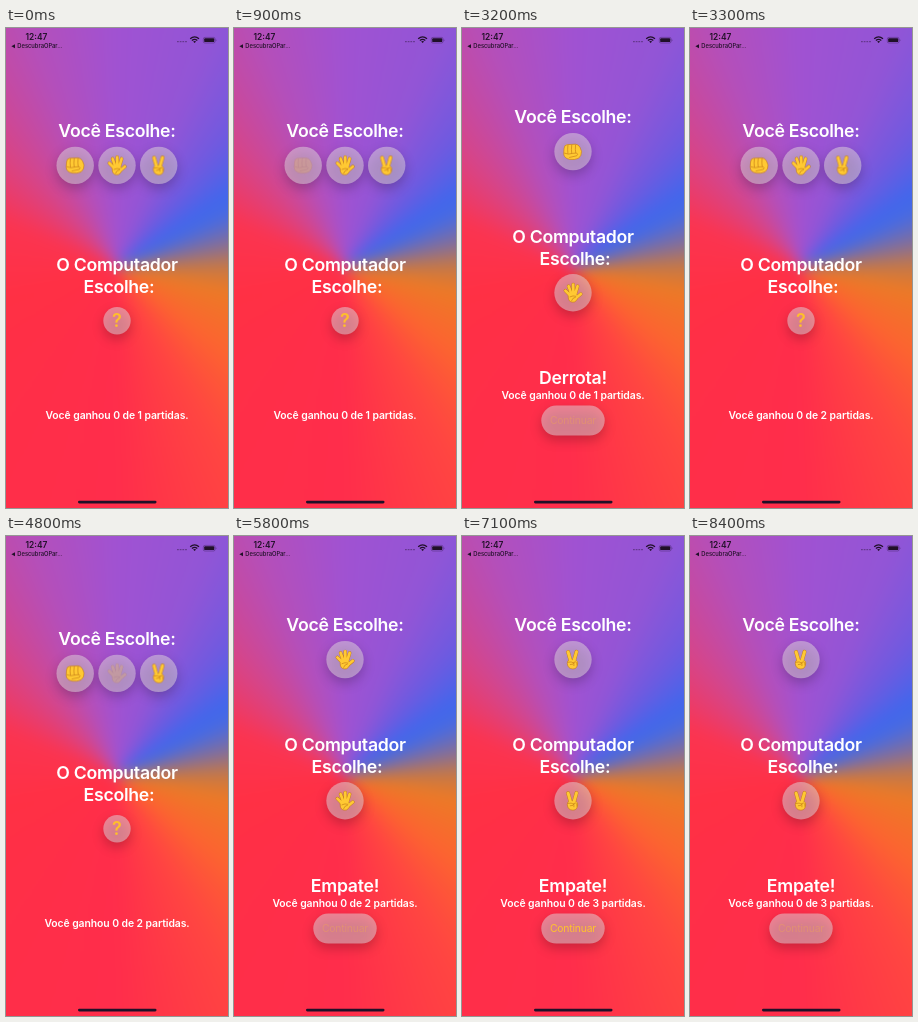
Recreate the animation shown at these times as an HTML page. Size 222 by 480 pixels, loop 8800 ms.

```html
<!DOCTYPE html>
<html lang="pt">
<head>
<meta charset="utf-8">
<title>Pedra, papel e tesoura</title>
<style>
  html, body { margin: 0; width: 100%; height: 100%; overflow: hidden; background: #ff2d4b; }
  .sky {
    position: fixed; inset: -30px; filter: blur(7px);
    background: conic-gradient(from 0deg at 50% 50%,
      #a052d2 0deg, #9255d6 22deg, #6e5ae0 40deg, #4067ec 57deg, #4a6be0 65deg,
      #806e9e 77deg, #c47848 89deg, #ec7a26 102deg, #fc6430 128deg,
      #ff4641 150deg, #ff2d4b 180deg, #ff3044 255deg, #fb3450 292deg,
      #d5458a 318deg, #b44fba 340deg, #a052d2 360deg);
  }
  svg { position: fixed; inset: 0; width: 100%; height: 100%; }
  text { font-family: Inter, Roboto, sans-serif; }
  .title, .count { fill: #fff; font-weight: 600; text-anchor: middle; }
  .title { font-size: 17.7px; letter-spacing: -.28px; }
  .count { font-size: 10.4px; letter-spacing: -.07px; }
  .button { fill: #ffc22e; font-size: 10.4px; letter-spacing: -.2px; text-anchor: middle; }
  .mark { fill: #ffbe2c; font-size: 18px; font-weight: 600; text-anchor: middle; }
  .glass { fill: rgba(225, 215, 222, .5); filter: drop-shadow(0 5px 6px rgba(0, 0, 0, .42)); }
  .rim { fill: none; stroke: #c37a18; stroke-linecap: round; stroke-linejoin: round; }
  .skin { fill: none; stroke: #ffc933; stroke-linecap: round; stroke-linejoin: round; }
  .crease { fill: none; stroke: #c98119; stroke-width: .7; stroke-linecap: round; }

  .pick, .result, .count-pos, .r1, .r2, .r3, .tap1, .tap2, .tap3, .tap-next {
    animation: 8.8s step-end infinite;
  }
  .pick { animation-name: pick; }
  .result { animation-name: result; }
  .count-pos { animation-name: count-pos; }
  .r1 { animation-name: r1; }
  .r2 { animation-name: r2; }
  .r3 { animation-name: r3; }
  .tap1 { animation-name: tap1; }
  .tap2 { animation-name: tap2; }
  .tap3 { animation-name: tap3; }
  .tap-next { animation-name: tap-next; }

  @keyframes pick {
    0%, 37.5%, 70.454% { opacity: 1; }
    12.5%, 56.818%, 80.681%, 100% { opacity: 0; }
  }
  @keyframes result {
    0%, 37.5%, 70.454% { opacity: 0; }
    12.5%, 56.818%, 80.681%, 100% { opacity: 1; }
  }
  @keyframes count-pos {
    0%, 37.5%, 70.454% { transform: translateY(20px); }
    12.5%, 56.818%, 80.681%, 100% { transform: translateY(0); }
  }
  @keyframes r1 { 0% { opacity: 1; } 37.5%, 100% { opacity: 0; } }
  @keyframes r2 { 0%, 70.454%, 100% { opacity: 0; } 37.5% { opacity: 1; } }
  @keyframes r3 { 0% { opacity: 0; } 70.454%, 100% { opacity: 1; } }
  @keyframes tap1 { 0%, 12.5%, 100% { opacity: 1; } 10.227% { opacity: .22; } }
  @keyframes tap2 { 0%, 56.818%, 100% { opacity: 1; } 54.545% { opacity: .22; } }
  @keyframes tap3 { 0%, 80.681%, 100% { opacity: 1; } 79.545% { opacity: .22; } }
  @keyframes tap-next {
    0%, 37.5%, 70.454% { opacity: 1; }
    36.363%, 65.909%, 95.454%, 100% { opacity: .25; }
  }
</style>
</head>
<body>
<div class="sky"></div>
<svg viewBox="0 0 222 480" preserveAspectRatio="none">
  <defs>
    <g id="fist">
      <path d="M-8.5-3Q-8.5-7-5-7.2L3-7.6Q6-7.4 7.5-4.5L9-.5Q9.3 4 6 6.5Q2 8.4-3 7.6Q-8.5 6.5-8.8 2Z"
            fill="#ffc933" stroke="#c37a18" stroke-width=".6"/>
      <path class="crease" d="M-4.6-6.5Q-5.2-2-4.6 1.6M-.8-6.8Q-1.4-2-.8 1.6M3-6.8Q2.6-2 3.2 1M-8 1.4Q-4 3.2 0 1.6L4 1.2Q6.2 2.2 4.2 4L-3 5.6"/>
    </g>
    <path id="spread" d="M-3.2 2.2L-7.6-2.2M-1.8.6L-4.4-6.6M.4 0L.2-8.2M2.4.8L4.6-6.6M3 5.2L7.8 1.2"/>
    <g id="hand">
      <use href="#spread" class="rim" stroke-width="3.5"/>
      <path d="M-4.4 1.4Q0-2.2 4 1.6L4.6 4.6Q3.8 9.4-.2 9.4Q-4.8 9.2-4.8 4Z" fill="#ffc933" stroke="#c37a18" stroke-width=".6"/>
      <use href="#spread" class="skin" stroke-width="2.7"/>
      <path class="crease" d="M-3 4Q0 2.4 2.8 3.4M-1.4 7.8Q-.8 5 2.4 4.4"/>
    </g>
    <path id="vee" d="M-1.8 1.6L-4.4-7.6M1.4 1.4L4-7.8"/>
    <g id="peace">
      <use href="#vee" class="rim" stroke-width="3.8"/>
      <path d="M-4.8 1.6Q-4-.2 0 .2Q5 0 5.2 3.2Q5.2 9.4.4 9.4Q-4.8 9.2-5.2 4Z" fill="#ffc933" stroke="#c37a18" stroke-width=".6"/>
      <use href="#vee" class="skin" stroke-width="3"/>
      <path class="crease" d="M-4.4 2.6Q-1 1.6 1.2 3.4Q1.4 5-2.2 5M1.4 2.6Q3.4 1.4 4.4 3.4V5.6M1.4 3V6"/>
    </g>
  </defs>

  <g fill="#201028">
    <text x="19.5" y="11.6" font-size="8.4" font-weight="600">12:47</text>
    <path d="M9 16.2V20.2L5.4 18.2Z"/>
    <text x="11.3" y="20.2" font-size="5.8" font-weight="500">DescubraOPar...</text>
    <path d="M171 13.7H181" fill="none" stroke="#201028" stroke-opacity=".5" stroke-width="1" stroke-dasharray="1.8 .9"/>
    <g fill="none" stroke="#201028" stroke-width="1.3">
      <path d="M184.2 10.7Q188.6 7.1 193 10.7M185.9 12.5Q188.6 10.3 191.3 12.5"/>
    </g>
    <path d="M187.1 13.4Q188.6 12.4 190.1 13.4L188.6 15Z"/>
    <rect x="197.3" y="9.4" width="11.8" height="5.6" rx="1.6" fill="none" stroke="#201028" stroke-opacity=".5" stroke-width=".6"/>
    <rect x="198.2" y="10.3" width="10" height="3.8" rx=".9"/>
    <path d="M209.9 11.2Q211 12.2 209.9 13.2Z" opacity=".6"/>
    <rect x="72" y="472.8" width="78.5" height="2.6" rx="1.3"/>
  </g>

  <g class="pick">
    <text class="title" x="111" y="109.4">Você Escolhe:</text>
    <g class="glass">
      <circle cx="69.2" cy="137.4" r="18.7"/>
      <circle cx="111" cy="137.4" r="18.7"/>
      <circle cx="152.7" cy="137.4" r="18.7"/>
    </g>
    <g transform="translate(69 137.4)"><use href="#fist" class="tap1"/></g>
    <g transform="translate(111 137.4)"><use href="#hand" class="tap2"/></g>
    <g transform="translate(152.5 137.4)"><use href="#peace" class="tap3"/></g>
    <text class="title" x="111" y="243.2">O Computador</text>
    <text class="title" x="113" y="265.2">Escolhe:</text>
    <circle class="glass" cx="111" cy="292.8" r="13.7"/>
    <text class="mark" x="111" y="299.2">?</text>
  </g>

  <g class="result">
    <text class="title" x="111" y="95.4">Você Escolhe:</text>
    <text class="title" x="111" y="215.2">O Computador</text>
    <text class="title" x="113" y="237.2">Escolhe:</text>
    <g class="glass">
      <circle cx="111" cy="123.6" r="18.7"/>
      <circle cx="111" cy="264.8" r="18.7"/>
      <rect x="79.3" y="377.6" width="63.4" height="30" rx="15"/>
    </g>
    <g class="r1">
      <use href="#fist" x="110.5" y="123.8"/>
      <use href="#hand" x="111" y="264.8"/>
      <text class="title" x="111" y="356">Derrota!</text>
    </g>
    <g class="r2">
      <use href="#hand" x="111" y="123.6"/>
      <use href="#hand" x="111" y="264.8"/>
      <text class="title" x="111" y="356">Empate!</text>
    </g>
    <g class="r3">
      <use href="#peace" x="110.5" y="123.6"/>
      <use href="#peace" x="110.5" y="264.8"/>
      <text class="title" x="111" y="356">Empate!</text>
    </g>
    <text class="button tap-next" x="111" y="396.4">Continuar</text>
  </g>

  <g class="count-pos">
    <text class="count r1" x="111" y="370.6">Você ganhou 0 de 1 partidas.</text>
    <text class="count r2" x="111" y="370.6">Você ganhou 0 de 2 partidas.</text>
    <text class="count r3" x="111" y="370.6">Você ganhou 0 de 3 partidas.</text>
  </g>
</svg>
</body>
</html>
```
